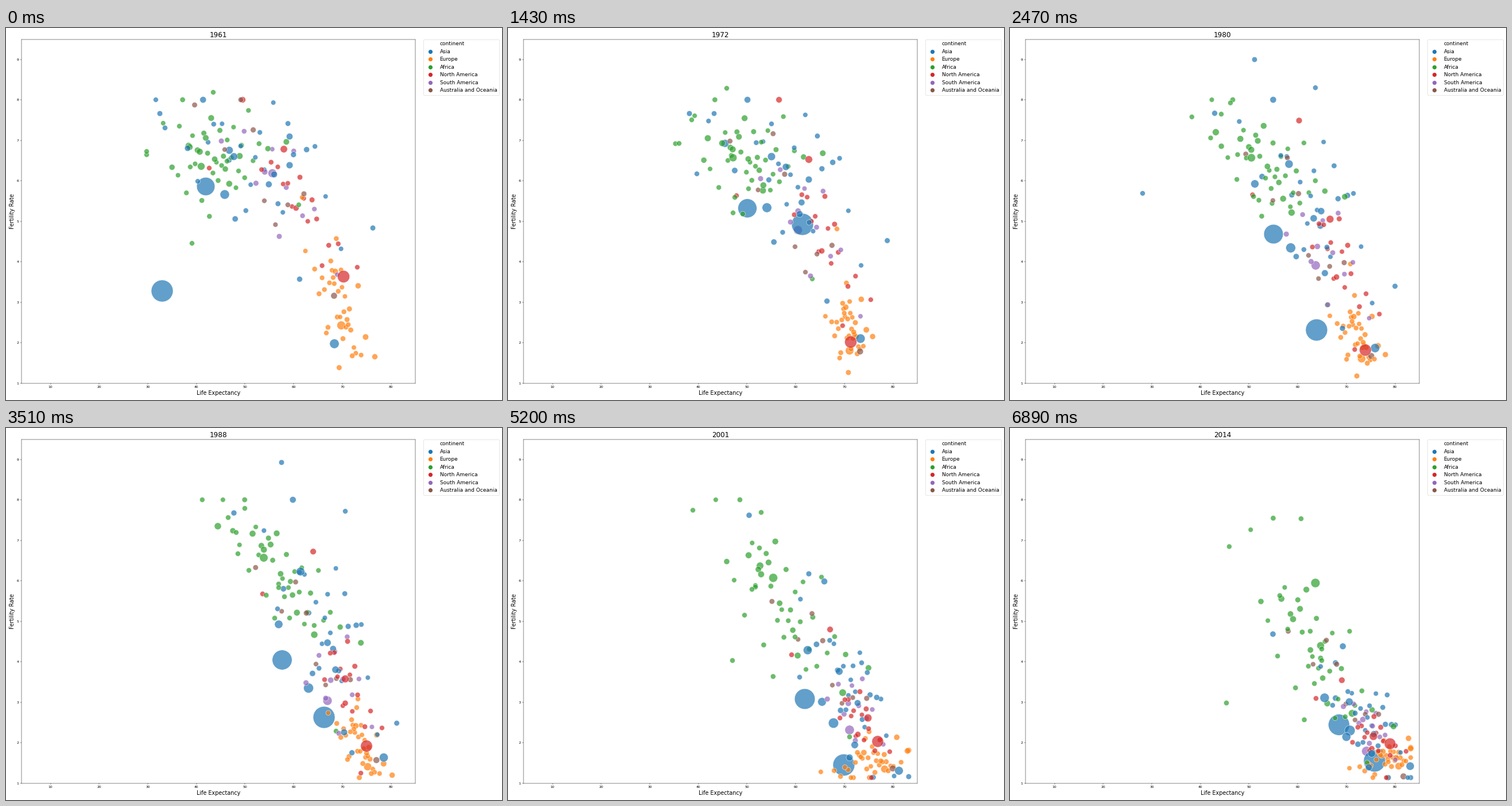
Animation of 864x648 px, one loop 7020 ms. Source, as a matplotlib script:

```python
import matplotlib.pyplot as plt
import numpy as np
from matplotlib.animation import FuncAnimation
from matplotlib.lines import Line2D

W, H, DPI = 864, 648, 43.2
FRAMES, INTERVAL, FIRST_YEAR = 54, 130, 1961
LEFT, RIGHT, TOP, BOTTOM = 26.7, 713, 19.6, 619
XLIM, YLIM = (4, 85), (1, 9.5)
KEYS = [0, 11, 27, 40, 53]
ASIA, EUROPE, AFRICA, NORTH, SOUTH, OCEANIA = [f"C{i}" for i in range(6)]
NAMES = ["Asia", "Europe", "Africa", "North America", "South America",
         "Australia and Oceania"]

rng = np.random.default_rng(4)
times = np.arange(FRAMES)
back, crowd, front = [], [], []


def glide(keys, rows):
    """Values in every frame, interpolated between key frames."""
    return [np.interp(times, keys, col) for col in np.transpose(rows)]


def track(layer, color, shares, points, extra=None):
    """A bubble with its own path; shares are relative to the largest one."""
    poses = dict(zip(KEYS, points)) | (extra or {})
    keys = sorted(poses)
    x, y = glide(keys, [poses[k] for k in keys])
    layer.append((color, np.linspace(*shares, FRAMES), x, y))


def swarm(color, count, poses):
    """Small bubbles around a sloping line: centre, spread, slope, scatter."""
    cx, cy, spread, slope, scatter = glide(KEYS, poses)
    ranks = (np.arange(count) + 0.5) / count
    along = np.log(ranks / (1 - ranks)) / 1.75
    aside = rng.permutation(along)
    for u, v in zip(along, aside):
        dx = spread * u
        x = np.clip(cx + dx, 245, 698)
        y = np.clip(cy + slope * dx + scatter * v, 125, 609)
        share = np.full(FRAMES, min(rng.exponential(0.01), 0.04))
        crowd.append((color, share, x, y))


# The largest populations
track(back, SOUTH, (.11, .15),
      [(464, 253), (505, 352), (560, 475), (595, 526), (621, 563)])
track(back, ASIA, (1, 1),
      [(272, 458), (513, 342), (554, 504), (585, 587), (635, 580)],
      {2: (420, 170), 9: (507, 288), 16: (523, 489), 19: (534, 526), 32: (564, 552)})
track(back, EUROPE, (.11, .06),
      [(584, 518), (595, 562), (630, 590), (656, 594), (677, 589)])
track(back, ASIA, (.68, .94),
      [(348, 276), (417, 314), (481, 404), (517, 472), (573, 517)],
      {19: (459, 359), 32: (493, 433)})
track(back, ASIA, (.137, .186),
      [(381, 290), (451, 313), (527, 453), (567, 514), (592, 527)])
track(back, ASIA, (.075, .115),
      [(389, 213), (378, 201), (475, 342), (547, 477), (586, 538)])
track(back, AFRICA, (.035, .07),
      [(318, 205), (348, 192), (369, 171), (439, 240), (541, 379)])
track(back, AFRICA, (.04, .066),
      [(407, 223), (444, 283), (537, 360), (583, 461), (596, 497)])
track(front, ASIA, (.143, .093),
      [(572, 550), (614, 541), (658, 574), (681, 597), (697, 589)])
track(front, NORTH, (.06, .09),
      [(484, 211), (524, 229), (591, 437), (627, 505), (633, 537)])
track(front, AFRICA, (.07, .13),
      [(340, 241), (392, 226), (449, 226), (462, 261), (532, 270)])
track(front, ASIA, (.07, .135),
      [(397, 224), (459, 224), (513, 250), (522, 387), (548, 470)])
track(front, ASIA, (.042, .075),
      [(494, 189), (524, 264), (560, 374), (577, 424), (591, 477)])
track(front, ASIA, (.042, .05),
      [(467, 255), (508, 324), (589, 530), (595, 574), (625, 591)])
track(front, NORTH, (.28, .235),
      [(588, 433), (597, 547), (628, 554), (644, 546), (662, 550)],
      {19: (619, 561)})
track(front, ASIA, (.05, .068),
      [(494, 239), (484, 242), (574, 421), (604, 552), (630, 567)])

# Small ones with a sudden collapse and recovery
SMALL = (.005, .008)
track(crowd, ASIA, SMALL,
      [(334, 267), (329, 254), (473, 315), (508, 434), (562, 483)],
      {13: (312, 262), 16: (145, 280), 18: (178, 284), 19: (231, 288), 22: (385, 260)})
track(crowd, AFRICA, SMALL,
      [(361, 112), (381, 105), (387, 156), (425, 281), (543, 405)],
      {32: (388, 226), 33: (104, 240), 34: (280, 243)})
track(crowd, AFRICA, SMALL,
      [(321, 242), (389, 222), (404, 219), (431, 277), (523, 354)],
      {29: (292, 222), 30: (375, 222)})
track(crowd, NORTH, SMALL,
      [(354, 244), (398, 292), (447, 289), (494, 395), (533, 471)],
      {48: (523, 440), 49: (265, 450), 50: (525, 455)})

# Small ones away from their group
track(crowd, ASIA, (.008, .018),
      [(277, 174), (359, 149), (480, 60), (524, 254), (567, 409)],
      {19: (426, 55), 32: (497, 119)})
track(crowd, ASIA, (.014, .024),
      [(268, 149), (316, 149), (397, 148), (420, 152), (458, 359)])
track(crowd, ASIA, SMALL,
      [(352, 199), (459, 167), (591, 145), (616, 409), (657, 465)],
      {19: (532, 104)})
track(crowd, AFRICA, SMALL,
      [(302, 171), (320, 160), (416, 140), (441, 147), (507, 158)])
track(crowd, AFRICA, SMALL,
      [(245, 215), (298, 201), (401, 182), (438, 209), (470, 292)])
track(crowd, AFRICA, SMALL,
      [(510, 308), (530, 437), (575, 528), (595, 538), (622, 583)])
track(crowd, AFRICA, SMALL,
      [(324, 375), (392, 322), (475, 278), (500, 364), (543, 385)])
track(crowd, AFRICA, SMALL,
      [(385, 232), (419, 280), (494, 331), (391, 405), (377, 479)])
track(crowd, EUROPE, SMALL,
      [(516, 295), (573, 350), (613, 472), (629, 529), (658, 577)])

swarm(ASIA, 25, [(450, 240, 85, .5, 75), (505, 270, 70, .55, 80),
                 (565, 350, 52, 1.3, 75), (605, 455, 43, 1.5, 48),
                 (630, 515, 40, 1, 38)])
swarm(EUROPE, 35, [(582, 485, 25, 1.4, 45), (594, 523, 17, .3, 32),
                   (617, 553, 23, .9, 25), (632, 582, 36, -.25, 18),
                   (659, 576, 28, -.3, 14)])
swarm(AFRICA, 38, [(365, 222, 50, 0, 43), (420, 222, 52, .15, 42),
                   (480, 250, 56, 1.05, 38), (475, 298, 62, 1, 60),
                   (525, 380, 58, 1.2, 58)])
swarm(NORTH, 17, [(512, 300, 50, 1.4, 30), (552, 360, 40, 1.9, 50),
                  (595, 445, 30, 2, 55), (613, 510, 26, 1.6, 38),
                  (634, 540, 28, .8, 28)])
swarm(SOUTH, 11, [(476, 276, 58, 1, 50), (527, 345, 50, 1.2, 50),
                  (580, 445, 33, .4, 50), (605, 487, 28, .6, 33),
                  (626, 518, 26, .9, 18)])
swarm(OCEANIA, 9, [(450, 260, 75, .7, 75), (500, 340, 70, .9, 75),
                   (540, 385, 65, 1.1, 48), (565, 425, 65, .95, 42),
                   (585, 460, 62, .85, 38)])

crowd = [crowd[i] for i in rng.permutation(len(crowd))]
colors, shares, px, py = zip(*(back + crowd + front))
sizes = 200 + 3800 * np.array(shares)
life = XLIM[0] + (np.array(px) - LEFT) / (RIGHT - LEFT) * (XLIM[1] - XLIM[0])
births = YLIM[0] + (BOTTOM - np.array(py)) / (BOTTOM - TOP) * (YLIM[1] - YLIM[0])

fig = plt.figure(figsize=(W / DPI, H / DPI), dpi=DPI, facecolor="white")
ax = fig.add_axes([LEFT / W, 1 - BOTTOM / H,
                   (RIGHT - LEFT) / W, (BOTTOM - TOP) / H])
ax.set(xlim=XLIM, ylim=YLIM)
ax.set_xlabel("Life Expectancy", fontsize=16)
ax.set_ylabel("Fertility Rate", fontsize=16)
title = ax.set_title(str(FIRST_YEAR), fontsize=20)
dots = ax.scatter(life[:, 0], births[:, 0], s=sizes[:, 0], c=colors, alpha=0.7,
                  edgecolors="white", linewidths=1.14)

handles = [Line2D([], [], ls="", label="continent")]
handles += [Line2D([], [], ls="", marker="o", ms=12, mew=0, color=f"C{i}", label=name)
            for i, name in enumerate(NAMES)]
ax.legend(handles=handles, fontsize=15, loc="upper left", numpoints=1,
          bbox_to_anchor=(1.02, 1), borderaxespad=0)


def update(i):
    dots.set_offsets(np.column_stack([life[:, i], births[:, i]]))
    dots.set_sizes(sizes[:, i])
    title.set_text(str(FIRST_YEAR + i))
    return dots, title


anim = FuncAnimation(fig, update, frames=FRAMES, interval=INTERVAL,
                     repeat=True, repeat_delay=0, blit=False)
plt.show()
```
